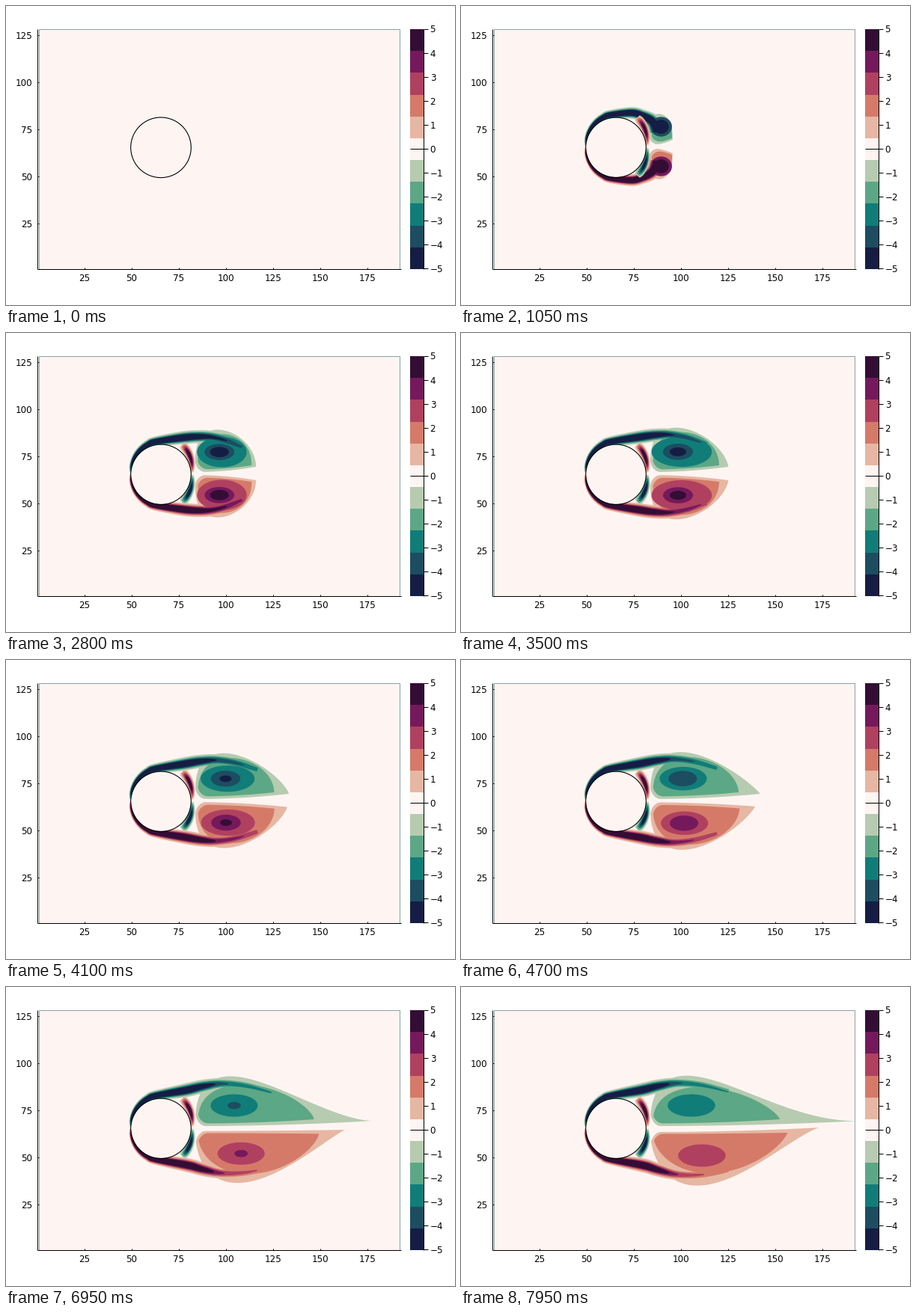
Write a matplotlib script that moves like this. It is 600 px wide and 400 px high and loops after 8 s.

```python
import numpy as np
import matplotlib.pyplot as plt
from matplotlib.animation import FuncAnimation
from matplotlib.collections import PolyCollection
from matplotlib.patches import Circle, Rectangle

FRAMES, STEP = 160, 50
CURL = ["#151d44", "#1c4d61", "#107d79", "#5ca785", "#b6cbb0", "#fef5f3",
        "#e6b7a2", "#d57a69", "#b04060", "#75195c", "#340d35"]
PALE = CURL[5]
NEG, POS = CURL[4::-1], CURL[6:]
LEVELS = (np.arange(5) + 0.5) * 10 / 11
AXIS = 188.0                    # symmetry line of the wake
CX, CY, R = 207.0, 189.3, 40.3  # cylinder
PX = 0.72                       # one pixel in points

# Shear layer knots (x, y, strength, width) when it rolls up and when it is stretched
YOUNG = np.array([(228, 143, 8, 4.6), (243, 147, 8, 5), (254, 153, 7.5, 6),
                  (260, 161, 7, 7), (261, 169, 5.5, 7)])
OLD = np.array([(240, 138, 7.5, 5.5), (266, 131.5, 5.4, 5.6), (292, 127.5, 3.3, 5),
                (325, 130, 2.6, 5), (362, 139, 2.2, 5)])


def grow(k, tau):
    return 1 - np.exp(-k / tau)


def bump(k, mid, width):
    return np.exp(-((k - mid) / width) ** 2)


def spline(p, n=12):
    """Open Catmull-Rom through p; extra columns ride along."""
    m = np.gradient(p, axis=0)
    u = np.linspace(0, 1, n)[:, None]
    a, b, ma, mb = p[:-1, None], p[1:, None], m[:-1, None], m[1:, None]
    c = ((1 + 2 * u) * (1 - u) ** 2 * a + u * (1 - u) ** 2 * ma
         + u * u * (3 - 2 * u) * b + u * u * (u - 1) * mb)
    return np.concatenate([c[:, :-1].reshape(-1, p.shape[1]), p[-1:]])


def ribbon(c, level):
    """Area where a Gaussian layer along c exceeds the level."""
    t = np.gradient(c[:, :2], axis=0)
    normal = np.stack([-t[:, 1], t[:, 0]], 1) / (np.hypot(t[:, 0], t[:, 1])[:, None] + 1e-9)
    keep = c[:, 2] > level
    if keep.sum() < 3:
        return None
    c, normal = c[keep], normal[keep]
    off = normal * (c[:, 3] * np.sqrt(np.log(c[:, 2] / level)))[:, None]
    return np.concatenate([c[:, :2] + off, (c[:, :2] - off)[::-1]])


def ellipse(x, y, rx, ry):
    if min(rx, ry) <= 0.3:
        return None
    a = np.linspace(0, 2 * np.pi, 60)
    return np.stack([x + rx * np.cos(a), y + ry * np.sin(a)], 1)


def teardrop(left, tip, base, tip_y, height, peak, sharp):
    """Flat side on the axis, highest at x = peak, tapering to the tip."""
    width = tip - left
    if width < 3:
        return None
    u = (1 - np.cos(np.linspace(0, np.pi, 120))) / 2
    p = np.clip((peak - left) / width, 0.1, 0.6)
    rise = sharp * p / (1 - p)
    h = height * (u / p) ** rise * ((1 - u) / (1 - p)) ** sharp
    floor = base + (tip_y - base) * u ** 2
    v = np.clip(u * width / 14, 0, 1)
    lift = 0.3 * height * (1 - np.sqrt(1 - (1 - v) ** 2))
    x = left + width * u
    return np.concatenate([np.stack([x, floor - np.maximum(h, lift)], 1),
                           np.stack([x, floor - lift], 1)[::-1]])


def layer(k):
    """Boundary layer over the front, continued by the shear layer."""
    psi = np.linspace(2, 80, 7)
    thick = 1.4 + 2.6 * grow(k, 9)
    w = thick * (0.25 + 0.75 * psi / 80)
    r = R + w * (0.2 + 0.55 * psi / 80)
    a = np.radians(psi)
    front = np.stack([206.7 - r * np.cos(a), AXIS - r * np.sin(a),
                      8 * grow(psi, 14), w], 1)

    q = grow(max(k - 21, 0), 45)
    rear = YOUNG + (OLD - YOUNG) * q
    rear[:, 2] = YOUNG[:, 2] + (OLD - YOUNG)[:, 2] * q ** 0.7
    # the layer peels off the wall during the first second
    free = min(k / 21, 1)
    ray = rear[:, :2] - (206.7, AXIS)
    wall = (206.7, AXIS) + ray / np.hypot(*ray.T)[:, None] * (R + 1.5)
    rear[:, :2] = wall + free * (rear[:, :2] - wall)
    rear[:, 3] *= 0.3 + 0.7 * free
    return spline(np.concatenate([front, rear]))


def lee_layer(k):
    """Opposite vorticity on the back of the cylinder."""
    s = np.linspace(0, 1, 40)
    a = np.radians(55 - 54 * s)
    r = R + 1 + 7 * (1 - s)
    power = 0.4 + 5.1 * np.sin(np.pi * s ** 0.85) * grow(max(k - 3, 0), 7)
    return np.stack([207 + r * np.cos(a), AXIS - r * np.sin(a), power, 4.4 - 2.4 * s], 1)


def wake(k, skew):
    """Five nested contours of the recirculation bubble."""
    left = 250 + 3 * grow(k, 30)
    top = 117.5 + 22 * np.exp(-(k / 80) ** 1.5) - 5 * skew
    peak = 246 + 60 * grow(k, 65) + 16 * skew
    start = grow(k, 12)
    outer = teardrop(left, 256 + 1.2 * k + 0.0035 * k * k - 56 * skew,
                     186 - 4 * skew, 179 + 9 * skew, (186 - top) * start, peak,
                     0.35 + 1.6 * (k / 160) ** 2 - 0.6 * skew)
    inset = 6 + 10 * (k / 160) ** 4
    inner = teardrop(left + 3.5, 251 + 1.53 * k - 0.0027 * k * k + 10 * skew,
                     182.5 - 3 * skew, 177 + 4 * skew, (182.5 - top - inset) * start,
                     peak + 0.1 * k, 0.3 + 0.45 * k / 160)

    x = 250 + 40 * grow(k, 45) + 0.12 * k + 14 * skew
    y = 158.5 + 7 * np.exp(-k / 25) - 8 * skew
    swell = bump(k, 68, 18)
    body = ellipse(x + 5 * swell, y, 32 * grow(k, 30) ** 1.5 + 13 * swell,
                   (15 + 6 * bump(k, 62, 22)) * start)

    def core(size, life, fade):
        rx = size * grow(k, 18) * max(1 - (k / life) ** fade, 0) ** 0.5
        return ellipse(x, y, rx, rx * (0.54 + 0.75 * bump(k, 0, 25)))

    return [outer, inner, body, core(21, 146, 4), core(15, 92, 3)]


def half(k, lower):
    main, other = (POS, NEG) if lower else (NEG, POS)
    skew = lower * np.clip((k - 70) / 89, 0, 1) ** 1.6
    band, lee = layer(k), lee_layer(k)
    if lower:
        ramp = skew * np.clip((band[:, 0] - 250) / 100, 0, 1)
        band[:, 1] -= 9 * ramp
        band[:, 2] -= 0.5 * ramp
    parts = []
    for level, blob, color in zip(LEVELS, wake(k, skew), main):
        parts += [(ribbon(band, level), color), (blob, color)]
    parts += [(ribbon(lee, level), color) for level, color in zip(LEVELS, other)]
    parts = [(p, c) for p, c in parts if p is not None]
    if lower:
        parts = [(p * (1, -1) + (0, 2 * AXIS), c) for p, c in parts]
    return parts


fig = plt.figure(figsize=(6, 4), dpi=100, facecolor="white")
ax = fig.add_axes([0, 0, 1, 1])
ax.set_xlim(0, 600)
ax.set_ylim(400, 0)
ax.axis("off")


def line(xs, ys):
    ax.plot(xs, ys, color="black", lw=PX, zorder=5, solid_capstyle="butt")


def label(x, y, s, ha):
    ax.text(x, y, s, ha=ha, va="center_baseline", fontsize=8.6, family="DejaVu Sans")


field = Rectangle((44.3, 31), 482, 321, fc=PALE, ec="#8aa3a8", lw=PX, zorder=1)
ax.add_patch(field)
flow = PolyCollection([], edgecolors="none", zorder=2)
ax.add_collection(flow, autolim=False)
flow.set_clip_path(field)
ax.add_patch(Circle((CX, CY), R, fill=False, ec="black", lw=PX * 1.1, zorder=4))

line([42.4, 42.4], [31, 352])
line([42, 528], [352, 352])
for v in range(25, 176, 25):
    x = 42 + 2.52 * v
    line([x, x], [352, 350])
    label(x, 363.3, str(v), "center")
for v in range(25, 126, 25):
    y = 354.3 - 2.52 * v
    line([42.4, 44.4], [y, y])
    label(35, y - 0.5, str(v), "right")

BAR = 321 / 11
for i, color in enumerate(CURL[::-1]):
    ax.add_patch(Rectangle((540, 31 + i * BAR), 18, BAR, fc=color, ec="none",
                           antialiased=False))
line([557.9, 557.9], [31, 352])
line([540, 558], [191.2, 191.2])
for v in range(-5, 6):
    y = 191.2 - 32.05 * v
    line([558, 563.5], [y, y])
    label(566.6, y - 0.5, str(v).replace("-", "\u2212"), "left")


def draw(k):
    parts = []
    if k > 0:
        parts = half(k, False) + half(k, True)
        parts.append((ellipse(CX, CY, R - 0.8, R - 0.8), PALE))
    flow.set_verts([p for p, _ in parts])
    flow.set_facecolor([c for _, c in parts] or "none")
    return flow,


anim = FuncAnimation(fig, draw, frames=FRAMES, interval=STEP, repeat=True,
                     repeat_delay=0, blit=False)
plt.show()
```
